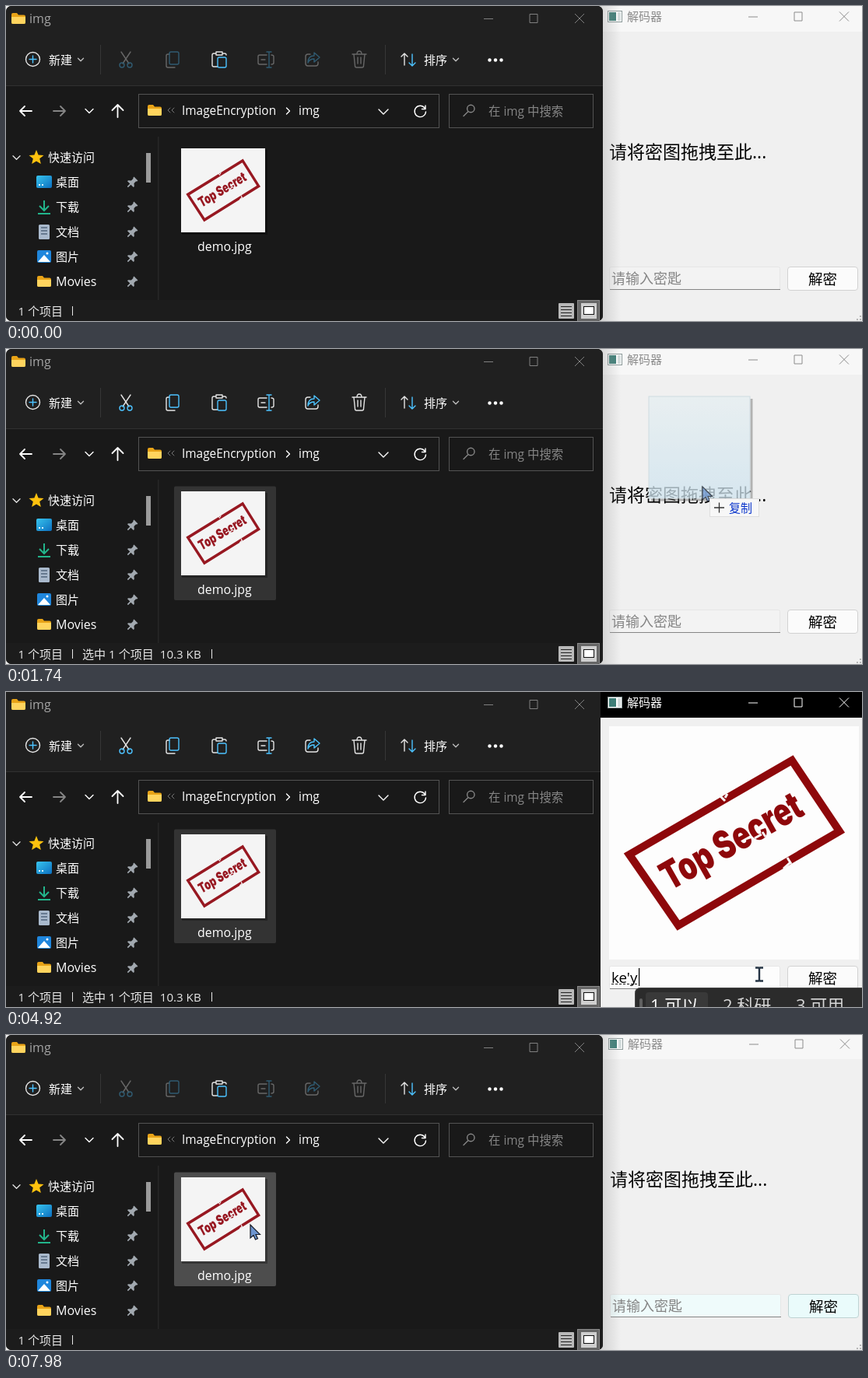
Animation, 1100 px wide and 405 px high, one loop 8000 ms. Source, as an HTML page:

```html
<!DOCTYPE html>
<html lang="zh-CN">
<head>
<meta charset="utf-8">
<title>解码器</title>
<style>
html, body { margin: 0; width: 100%; height: 100%; overflow: hidden; background: #f0f0f0; }
svg { display: block; width: 1100px; height: 405px; }
text { white-space: pre; font-family: "Open Sans", "Noto Sans CJK SC", "Noto Sans CJK", sans-serif; }
.stamp { font: 900 50px "Inter", "Liberation Sans", sans-serif; }
.line { fill: none; stroke-width: 1.4; stroke: #e4e4e4; stroke-linecap: round; stroke-linejoin: round; }
.blue { stroke: #4cc2ff; }
</style>
</head>
<body>
<svg id="stage" viewBox="0 0 1100 405" xmlns="http://www.w3.org/2000/svg"></svg>
<script>
const LOOP = 8000, STEP = 60;

const text = (x, y, s, size, fill, attrs = '') =>
  `<text x="${x}" y="${y}" font-size="${size}" fill="${fill}" ${attrs}>${s}</text>`;
const rect = (x, y, w, h, fill, attrs = '') =>
  `<rect x="${x}" y="${y}" width="${w}" height="${h}" fill="${fill}" ${attrs}/>`;
const line = (d, attrs = '') => `<path class="line" d="${d}" ${attrs}/>`;
const blue = d => `<path class="line blue" d="${d}"/>`;
const at = (x, y, s, attrs = '') => `<g transform="translate(${x} ${y})" ${attrs}>${s}</g>`;

const windowButtons = (xs, y, attrs) => `<path fill="none" ${attrs} d="M${xs[0] - 6} ${y + .5}h12
  M${xs[1] - 5} ${y - 5.5}h10v11h-10z M${xs[2] - 6} ${y - 6}l12 12m0 -12l-12 12"/>`;

const folder = (x, y) => at(x, y,
  '<path d="M0 2q0-2 2-2h5l2 2.5h7q2 0 2 2V12q0 2-2 2H2q-2 0-2-2z" fill="#e8a317"/>' +
  '<path d="M0 5h18v7q0 2-2 2H2q-2 0-2-2z" fill="#ffd45e"/>');

const chevron = (x, y, r, color = '#bbb') => line(`M${x - r} ${y - r / 2}l${r} ${r} ${r} ${-r}`, `style="stroke:${color}"`);

const stamp = color => `
  <path d="M801 209L1010 88 1071 179 864 300z" fill="none" stroke="${color}" stroke-width="10"/>
  <g transform="translate(853 256) rotate(-29.5) scale(.75 1)">
    <text class="stamp" fill="${color}">Top Secret</text></g>
  <path d="M917 133l7 7M927 131l-3 5M999 227l9-8M1004 213l5 8M962 188l9-5M972 180l4 6" stroke="#fafafa" stroke-width="3"/>`;

const pin = y => at(162, y, '<path transform="rotate(45)" d="M-3.5-7h7v1.5l-1 1v3.5l3 2.5v1.5h-4.7v5h-1.6v-5h-4.7v-1.5l3-2.5v-3.5l-1-1z" fill="#a2a9b0"/>');

const star = Array.from({ length: 10 }, (_, i) => {
  const r = i % 2 ? 4.4 : 10, a = (i / 5 - .5) * Math.PI;
  return [39 + r * Math.cos(a), 195 + r * Math.sin(a)].join();
}).join(' ');

const editIcons = [
  [154, line('M-6 -10L4 5M6 -10L-4 5') + blue('M-8 7a3 3 0 1 0 6 0a3 3 0 1 0 -6 0M2 7a3 3 0 1 0 6 0a3 3 0 1 0 -6 0')],
  [214, line('M-4 -7h-2q-2 0 -2 2v13q0 2 2 2h9') + blue('M-2 -10h8q2 0 2 2v12q0 2 -2 2h-8q-2 0 -2 -2v-12q0 -2 2 -2z')],
  [334, line('M1 -6h-9q-2 0 -2 2v8q0 2 2 2h9M7 -6q3 0 3 2v8q0 2 -3 2M-6 0h5') + blue('M1 -10h6M4 -10v20M1 10h6')],
  [394, line('M-3 -7h-3q-3 0 -3 3v9q0 3 3 3h10q3 0 3 -3v-2') + blue('M2 -9l7 6 -7 6v-4q-6 0 -8 5q0 -9 8 -9z')],
  [454, line('M-9 -7h18M-3 -7q0 -4 3 -4t3 4M-7 -7l1.5 15q0 2 2 2h7q2 0 2 -2l1.5 -15M-2 -3v8M2 -3v8')]
].map(([x, s]) => at(x, 69, s)).join('');

const sideIcons =
  rect(39, 218, 20, 16, 'url(#desk)', 'rx="2"') + rect(42, 229, 2, 2, '#d8f6ff') + rect(46, 229, 2, 2, '#d8f6ff') +
  '<path d="M49 250v13m-6-6l6 6 6-6M41 267h16" fill="none" stroke="#22b58b" stroke-width="2"/>' +
  rect(42, 281, 14, 19, '#a9b9cc', 'rx="1.5"') + '<path d="M45 285h8m-8 4h8m-8 4h8" stroke="#51657e" stroke-width="1.5"/>' +
  rect(40, 314, 18, 16, '#1f86dc', 'rx="2"') + '<path d="M41 329l8-9 8 9z" fill="#fff"/><circle cx="53" cy="318" r="1.5" fill="#fff"/>' +
  folder(40, 347);

const side = [['桌面', 226], ['下载', 258], ['文档', 290], ['图片', 322]]
  .map(([s, y]) => text(64, y + 5.5, s, 15, '#fff') + pin(y + 1)).join('') +
  text(64, 360, 'Movies', 16, '#fff') + pin(355);

const explorer = `<g clip-path="url(#edge)">
  ${rect(0, 0, 768, 405, '#191919')}${rect(0, 0, 768, 102, '#202020')}${rect(0, 102, 768, 1, '#303030')}
  ${folder(7, 9)}${text(30, 22, 'img', 16, '#a5a5a5')}
  ${windowButtons([620, 678, 737], 16, 'stroke="#808080"')}
  <circle class="line" cx="34.5" cy="68.5" r="9"/>${blue('M30 68.5h9M34.5 64v9')}
  ${text(55, 74.5, '新建', 15, '#fff', 'font-weight="500"')}${chevron(96, 69, 3.5)}
  <path d="M121.5 50v38M487.5 50v38" stroke="#363636"/>
  <g id="edit">${editIcons}</g>
  ${at(274, 69, line('M-4 -8h-3q-2 0 -2 2v13q0 2 2 2h5M4 -8h3q2 0 2 2M-4 -10h8v4h-8z') + blue('M0 -3h7q2 0 2 2v9q0 2 -2 2h-7q-2 0 -2 -2v-9q0 -2 2 -2z'))}
  ${line('M512 76v-15l-4 4m4-4l4 4')}${blue('M522 62v15l-4 -4m4 4l4 -4')}
  ${text(537, 74.5, '排序', 15, '#fff', 'font-weight="500"')}${chevron(578, 69, 3.5)}
  ${[621.5, 629, 636.5].map(x => `<circle cx="${x}" cy="69.5" r="2.2" fill="#fff"/>`).join('')}
  ${line('M33 135h-15m6-6l-6 6 6 6', 'style="stroke:#fff;stroke-width:1.8"')}
  ${line('M61 135h15m-6-6l6 6-6 6', 'style="stroke:#858585;stroke-width:1.8"')}
  ${chevron(107, 135, 5, '#fff')}
  ${line('M143.5 143v-16m-7 7l7-7 7 7', 'style="stroke:#fff;stroke-width:1.8"')}
  ${rect(170.5, 113.5, 386, 43, '#191919', 'stroke="#535353"')}
  ${rect(569.5, 113.5, 185, 43, '#191919', 'stroke="#535353"')}
  ${folder(182, 127)}${line('M211 131l-3 3 3 3m5-6l-3 3 3 3', 'style="stroke:#777;stroke-width:1"')}
  ${text(226, 140, 'ImageEncryption', 15.4, '#fff')}${line('M360.5 131l4 4-4 4', 'style="stroke:#fff"')}
  ${text(376, 140, 'img', 15.5, '#fff')}${chevron(485, 136, 6, '#fff')}
  ${line('M538 131a7.2 7.2 0 1 0 1.5 5M539 128v4.5h-4.5', 'style="stroke:#fff"')}
  ${line('M602 132a4.7 4.7 0 1 0 -9.4 0a4.700 4.700 0 1 0 9.4 0M594 135.500l-6 6', 'style="stroke:#868686"')}
  ${text(620, 140.5, '在 img 中搜索', 15.4, '#858585')}
  ${chevron(13.5, 195, 4.5, '#ddd')}<polygon points="${star}" fill="#ffc20e"/>
  ${text(54, 199.5, '快速访问', 15, '#fff')}${sideIcons}${side}
  ${rect(180, 189, 6, 38, '#9b9b9b')}${rect(195, 168, 1.5, 210, '#272727')}
  ${rect(216, 176.5, 131, 146.5, '#4d4d4d', 'id="tile" rx="2"')}
  ${rect(226, 185, 110, 109, '#000', 'opacity=".3"')}
  ${rect(225, 183, 108, 108, '#f4f4f4')}
  <g transform="translate(225 183) scale(.3365 .36) translate(-775 -44)">${stamp('#971821')}</g>
  ${text(246, 315, 'demo.jpg', 15.9, '#fff')}
  ${rect(0, 378, 768, 27, '#1c1c1c')}
  ${text(15.5, 398, '1 个项目', 15, '#e8e8e8')}${rect(85, 386, 1, 12, '#e8e8e8')}
  <g id="picked">${text(98, 398, '选中 1 个项目  10.3 KB', 15.1, '#e8e8e8')}${rect(264, 386, 1, 12, '#e8e8e8')}</g>
  ${rect(710, 382, 20, 20, '#b9b9b9', 'rx="1"')}<path d="M713 386.5h14m-14 4h14m-14 4h14m-14 4h14" stroke="#222"/>
  ${rect(734.5, 378.5, 28, 27, '#666', 'stroke="#8c8c8c"')}${rect(739, 382, 20, 20, '#cfcfcf')}
  ${rect(742.5, 386.5, 13, 10, '#fff', 'stroke="#111"')}
</g>`;

const decoder = `
  ${rect(764, 0, 336, 405, '#f0f0f0')}${rect(764, 0, 336, 33, '#f6f6f6', 'id="bar"')}
  <g id="win">
    ${rect(773.5, 6.5, 18, 14, '#fff', 'stroke="#8b9999"')}${rect(775, 8, 9, 11, '#3f7f78')}${rect(786, 8, 4, 11, '#d5dede')}
    ${text(798, 19, '解码器', 15, 'currentColor')}
    ${windowButtons([960, 1018, 1077], 13.5, 'stroke="currentColor"')}
    <g id="empty">${text(775, 195.5, '请将密图拖拽至此...', 23, '#000')}</g>
    <g id="full">${rect(775, 44, 321, 300, '#fdfdfd')}${stamp('#8e080b')}</g>
    <g id="form">
      ${rect(775.5, 335.5, 219, 29, '#f6f6f6', 'id="field" stroke="#e6e6e6" rx="2"')}${rect(776, 364, 219, 1, '#858585')}
      ${text(778, 357, '请输入密匙', 18, '#858585', 'id="hint"')}
      ${text(778, 356.5, '', 18.8, '#000', 'id="typed"')}
      <path id="dash" stroke="#111" stroke-dasharray="3 2" d="M778 358.5"/>
      ${rect(778, 338, 1.2, 23, '#000', 'id="caret"')}
      ${rect(1004.5, 335.5, 90, 30, '#fdfdfd', 'id="button" rx="3.5" stroke="#d2d2d2"')}
      ${text(1031, 357.5, '解密', 18.5, '#000')}
    </g>
  </g>
  <path id="grip" d="M1097 399h2m-6 4h2m2 0h2" stroke="#b5b5b5" stroke-width="2"/>
  ${rect(764, 0, 26, 405, 'url(#shade)', 'id="shadow"')}
  <g id="ime">${rect(808.5, 380.5, 310, 60, '#2b2b2b', 'rx="6" stroke="#484848"')}
    ${rect(822, 386, 80, 40, '#393939', 'rx="4"')}${rect(814, 394, 4, 20, '#606060', 'rx="2"')}
    ${[828, 921, 1015].map((x, i) => text(x, 411, '', 22, i ? '#d8d8d8' : '#fff', 'class="word"')).join('')}</g>`;

const pointer = `
  <g id="ghost"><path d="M-66 17h129v-130" fill="none" stroke="#555" stroke-width="3" opacity=".4"/>
    ${rect(-69, -116, 130, 131, 'url(#glass)', 'opacity=".75" stroke="#c4d5dc"')}</g>
  <path id="arrow" d="M0 0v17l4-3.5 2.5 5.5 3-1.3-2.5-5.2h5.5z" fill="#6d95cf" stroke="#161b26" stroke-width="1.2"/>
  <path id="beam" d="M-5-8.5h4l1 1 1-1h4M0-7.5v15M-5 8.5h4l1-1 1 1h4" fill="none" stroke="#253444" stroke-width="2.4"/>
  <g id="copy">${rect(9.5, 15.5, 63, 23, '#f7f7f7', 'stroke="#dedede"')}
    <path d="M15 27h13m-6.5-6.5v13" stroke="#333" stroke-width="1.3"/>${text(34, 32.5, '复制', 15, '#0a35cc')}</g>`;

const stage = document.getElementById('stage');
stage.innerHTML = `<defs>
  <clipPath id="edge"><rect id="edgeBox" width="767" height="405"/></clipPath>
  <linearGradient id="shade"><stop stop-color="#999" stop-opacity=".35"/><stop offset="1" stop-color="#999" stop-opacity="0"/></linearGradient>
  <linearGradient id="glass" x2="0" y2="1"><stop stop-color="#e6eff2"/><stop offset="1" stop-color="#cfe4ef"/></linearGradient>
  <linearGradient id="desk" x2="1" y2="1"><stop stop-color="#38c5ee"/><stop offset="1" stop-color="#0c6fc0"/></linearGradient>
  </defs>${decoder}${explorer}<g id="pointer">${pointer}</g>`;

const el = {};
stage.querySelectorAll('[id]').forEach(node => el[node.id] = node);
const words = [...stage.querySelectorAll('.word')];
const set = (id, attrs) => { for (const k in attrs) el[id].setAttribute(k, attrs[k]); };
const show = (id, on) => el[id].setAttribute('display', on ? 'inline' : 'none');

// Pointer paths: [time, x, y]; each is visible only within its own time span.
const paths = [
  [[120, 1074, 110], [480, 760, 190], [900, 312, 226], [1380, 290, 235], [1440, 292, 234], [1740, 895, 177],
   [1860, 925, 190], [1980, 930, 195], [2520, 1065, 370], [2820, 1061, 368], [3060, 1061, 368],
   [3600, 968, 363], [5880, 968, 363], [6420, 1040, 412]],
  [[7440, 1062, 62], [7980, 314, 244]]
];

function pointerAt(t) {
  const path = paths.find(p => t >= p[0][0] && t <= p[p.length - 1][0]);
  if (!path) return null;
  const i = Math.max(1, path.findIndex(p => p[0] >= t));
  const [a, b] = [path[i - 1], path[i]];
  const k = (t - a[0]) / (b[0] - a[0]), e = k * k * (3 - 2 * k);
  return { x: a[1] + (b[1] - a[1]) * e, y: a[2] + (b[2] - a[2]) * e };
}

const within = (p, x, y, w, h) => !!p && p.x >= x && p.x <= x + w && p.y >= y && p.y <= y + h;
const during = (t, a, b) => t >= a && t < b;

// Typing: [time, text, underline width, candidates]
const typing = [
  [4440, 'k', 10, ['看', '可', '块']],
  [4680, 'ke', 21, ['可', '课', '克']],
  [4920, "ke'y", 35, ['可以', '科研', '可用']],
  [5160, 'key', 30, null]
];

function render(ms) {
  const t = Math.floor(ms / STEP) * STEP;
  const p = pointerAt(t);
  const reset = t >= 7080;
  const picked = during(t, 1440, 7080), loaded = during(t, 1920, 7080);
  const front = during(t, 3060, 7080), active = during(t, 3060, 6900);
  const dragging = during(t, 1500, 1920);
  const dy = loaded ? 17 : 0;

  set('edgeBox', { width: front ? 764 : 767, rx: front ? 0 : 7 });
  show('shadow', !front);
  set('edit', { opacity: picked ? 1 : .36 });
  show('picked', picked);
  const hover = within(p, 216, 177, 131, 146) && !dragging;
  show('tile', hover || picked);
  set('tile', { fill: hover ? '#4d4d4d' : '#333' });

  set('bar', { fill: active ? '#000' : '#f7f7f7', height: reset ? 31 : 33 });
  set('win', { transform: reset ? 'translate(1 -2)' : '', color: active ? '#fff' : '#8c8c8c' });
  show('empty', !loaded);
  show('full', loaded);
  show('grip', !loaded);
  set('form', { transform: `translate(0 ${dy})` });

  const entry = reset ? null : typing.filter(e => t >= e[0]).pop();
  const composing = !!(entry && entry[3]);
  const width = entry ? entry[2] : 0;
  show('hint', !entry);
  el.typed.textContent = entry ? entry[1] : '';
  set('dash', { d: `M778 358.5h${width}` });
  show('dash', composing);
  show('ime', composing);
  if (composing) words.forEach((w, i) => w.textContent = `${i + 1} ${entry[3][i]}`);
  set('caret', { x: 778 + width });
  show('caret', during(t, 3660, 4140) || during(t, 4440, 5400) || during(t, 5940, 6420));

  const hot = within(p, 1004, 335 + dy, 91, 31);
  set('field', { fill: reset ? '#effbfb' : loaded ? '#fdfdfd' : '#f3f3f3' });
  set('button', {
    fill: hot ? '#eaf3fb' : reset ? '#eafbfb' : '#fbfbfb',
    stroke: hot ? '#5b9fd8' : reset ? '#bfd3d3' : '#d2d2d2'
  });

  show('pointer', !!p);
  if (!p) return;
  const beam = loaded && within(p, 775, 352, 220, 31);
  set('pointer', { transform: `translate(${p.x.toFixed(1)} ${p.y.toFixed(1)})` });
  show('beam', beam);
  show('arrow', !beam);
  set('arrow', { opacity: dragging ? .75 : 1 });
  show('ghost', dragging);
  show('copy', dragging && p.x > 767);
}

function frame(now) {
  render(now % LOOP);
  requestAnimationFrame(frame);
}
render(0);
requestAnimationFrame(frame);
</script>
</body>
</html>
```
